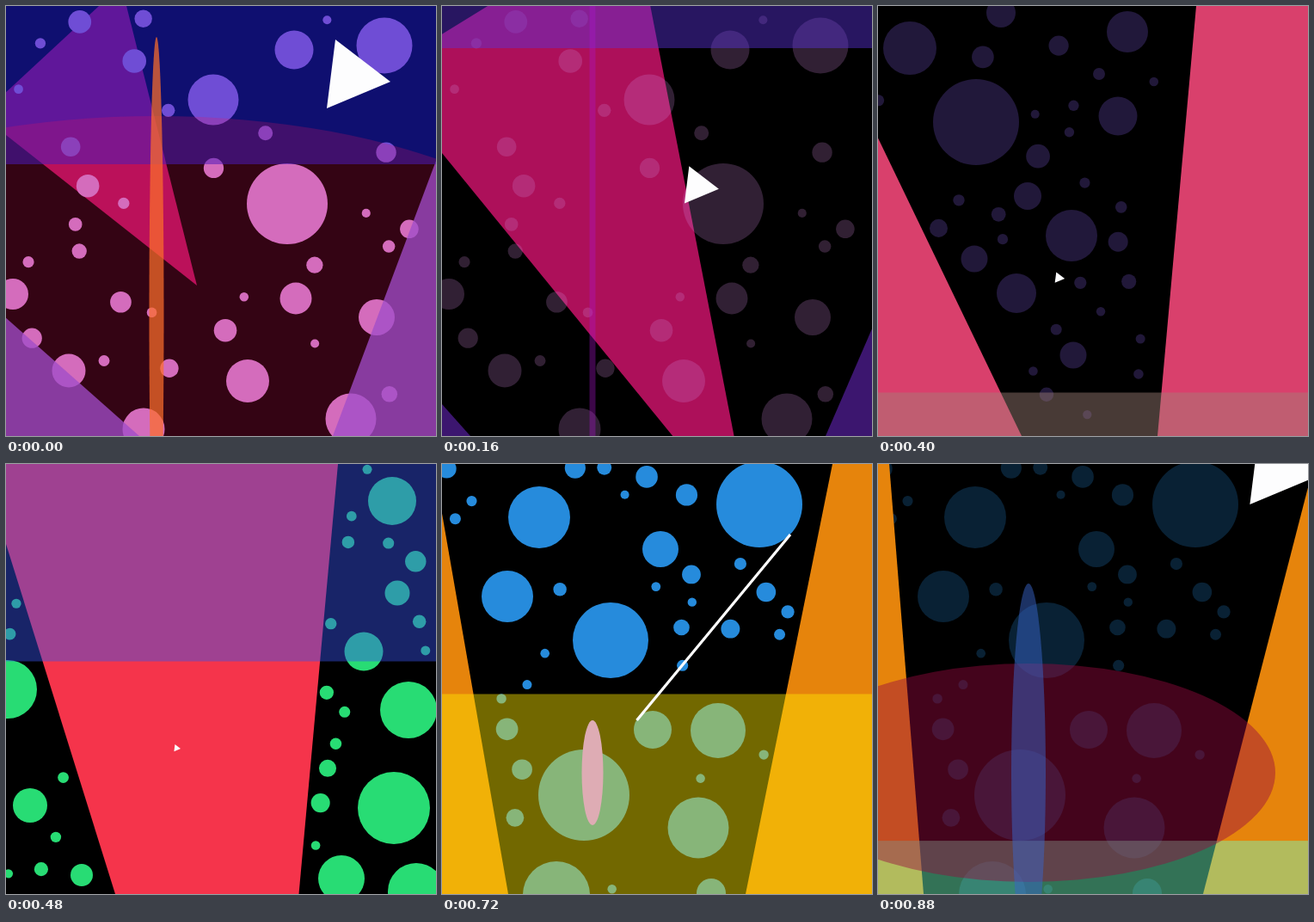
These frames come from a looping animation (500x500 px, 960 ms). An HTML page with a canvas:

```html
<!DOCTYPE html>
<html lang="en">
<head>
<meta charset="utf-8">
<title>Strobe loop</title>
<style>
html, body { margin: 0; width: 100%; height: 100%; overflow: hidden; background: #000; }
canvas { display: block; width: 500px; height: 500px; }
</style>
</head>
<body>
<canvas id="stage" width="500" height="500"></canvas>
<script>
const ctx = document.getElementById('stage').getContext('2d');
const SIZE = 500, STEP = 80, COUNT = 12;
const CX = 175, CY = 359; // vanishing point

// Each scene lasts three steps. walls: left x at top and bottom, right x at top
// and bottom; edge: y of the horizontal split; move and slide: change per step.
// big: main dots as x, y, radius; small: how many more are scattered between.
const scenes = [
  {
    walls: [-410, 155, 567.5, 380], move: [-1, -61, 47.5, 33], edge: 184, slide: -67.5,
    wallFill: ['#8c5de8c4', '#8531f59e', '#8531f573'],
    bandFill: ['#1e1ed387', '#753ad97a', '#5a32d773'],
    dotFill: ['#cd85d7', '#cd85d799', '#cd85d73d'],
    big: [327,230,47, 440,46,32.5, 241,109,29.5, 401,480,29.5, 281,436,25, 160,492,24.5,
      335,51,22.5, 431,362,21, 73,424,19.5, 337,340,18.5, 8,335,18],
    small: 29, fits: () => true
  },
  {
    walls: [-114, 203, 330, 317], move: [20, -18, 20, 4], edge: 307.5, slide: 71, low: true,
    wallFill: ['#d9406c', '#d9406c', '#d9406c'],
    bandFill: ['#f0a02c73', '#c8965073', '#a0827873'],
    dotFill: ['#8c64f0', '#8c64f099', '#8c64f03d'],
    big: [114,135,50, 37,49,31, 225,267,30, 290,30,24, 161,334,23, 279,128,22.5,
      143,8,17, 174,221,16, 227,406,15.5, 112,294,15.5],
    small: 25, fits: (x, r, a, b) => x - r > a && x + r < b
  },
  {
    walls: [-29, 127, 386, 340.5], move: [15.5, -11.25, 24, 2.25], edge: 229.5, slide: -84,
    inner: true,
    wallFill: ['#f5344b', '#f5344b', '#f5344b'],
    bandFill: ['#3550e773', '#5028c373', '#6b00a073'],
    dotFill: ['#28dc74', '#787d5fbf', '#d1214b7a'],
    big: [451,400,42, 2,262,34, 468,286,33, 477,497,33, 449,43,28, 390,482,27,
      416,218,22.5, 28,397,20, 455,150,14.5, 88,478,13],
    small: 20, fits: (x, r, a, b) => x + r < a || x - r > b
  },
  {
    walls: [-10, 77, 454, 353], move: [11.5, -12, 26.5, 12.5], edge: 267.5, slide: 85.3, low: true,
    wallFill: ['#e6840c', '#e6840c', '#e6840c'],
    bandFill: ['#fde70073', '#b6f05e73', '#71fcbe73'],
    dotFill: ['#268bdc', '#268bdc99', '#268bdc3c'],
    big: [165,385,53, 369,47,50, 196,205,44, 133,501,39, 113,62,36, 298,423,35.5,
      321,310,32, 76,154,30, 245,309,22, 254,99,21, 313,499,17],
    small: 28, fits: (x, r, a, b) => x - r > a && x + r < b
  }
];

// Rings around the vanishing point: radius x, radius y, fill.
const wide = {
  11: [287, 127, '#97093e73'],
  0: [525, 231, '#ec125b38'],
  1: [685, 294, '#3264fa14']
};
const tall = {
  7: [4, 23, '#ff8848'],
  8: [8, 43.5, '#ff8848'],
  9: [12.5, 61, '#deacb4'],
  10: [17, 130, '#8c87bebf'],
  11: [20, 220, '#3864c880'],
  0: [8.5, 323, '#fc6e2ab8'],
  1: [5.5, 2400, '#ad16cd99'],
  2: [3.5, 2600, '#ad16cd59']
};

const shard = [134, -24, 222, 325, -29, 127];
const shardMove = [44, -40, 70, 145, -23, -24];

// A white triangle falls to the vanishing point, then a ray shoots back out.
const ship = [208, -320, 272, -271, 198, -240];
const shipScale = [1, .743, .54, .363, .24, .155, .103];
shipScale[11] = 1.3;
const rays = {
  7: [186, 346, 215, 311, .6],
  8: [200, 331, 279.5, 235.5, 1.2],
  9: [226.5, 298, 405, 82, 3.2],
  10: [255, 263, 548, -91, 5]
};

const mix = (a, b, t) => a + (b - a) * t;
const shift = (from, by, t) => from.map((v, i) => v + by[i] * t);

function seeded(s) {
  return () => (s = s * 16807 % 2147483647) / 2147483647;
}

// Fills the gaps between the main dots without touching them or the walls.
function scatter({ big, small, walls: [l0, l1, r0, r1], fits }, seed) {
  const rnd = seeded(seed * 977 + 31), dots = [];
  for (let i = 0; i < big.length; i += 3) dots.push(big.slice(i, i + 3));
  const goal = dots.length + small;
  for (let tries = 0; dots.length < goal && tries < 6000; tries++) {
    const x = rnd() * SIZE, y = rnd() * SIZE, r = 5 + 9 * rnd() ** 1.6;
    const free = dots.every(([a, b, c]) => Math.hypot(x - a, y - b) > r + c + 13);
    if (free && fits(x, r, mix(l0, l1, y / SIZE), mix(r0, r1, y / SIZE))) dots.push([x, y, r]);
  }
  return dots;
}
scenes.forEach((s, i) => { s.dots = scatter(s, i + 1); });

function poly(fill, p) {
  ctx.fillStyle = fill;
  ctx.beginPath();
  for (let i = 0; i < p.length; i += 2) ctx.lineTo(p[i], p[i + 1]);
  ctx.fill();
}

function oval(x, y, rx, ry, fill) {
  ctx.fillStyle = fill;
  ctx.beginPath();
  ctx.ellipse(x, y, rx, ry, 0, 0, Math.PI * 2);
  ctx.fill();
}

function draw(n) {
  const s = scenes[Math.floor(n / 3)], k = n % 3;
  const [l0, l1, r0, r1] = shift(s.walls, s.move, k);
  const wall = s.wallFill[k], y = s.edge + s.slide * k;

  ctx.fillStyle = '#000';
  ctx.fillRect(0, 0, SIZE, SIZE);

  if (n < 3) poly('#ad105a', shift(shard, shardMove, n));
  if (s.inner) poly(wall, [l0, 0, r0, 0, r1, SIZE, l1, SIZE]);
  for (const [x, cy, r] of s.dots) oval(x, cy, r, r, s.dotFill[k]);
  if (!s.inner) {
    poly(wall, [-SIZE, 0, l0, 0, l1, SIZE, -SIZE, SIZE]);
    poly(wall, [2 * SIZE, 0, r0, 0, r1, SIZE, 2 * SIZE, SIZE]);
  }

  ctx.fillStyle = s.bandFill[k];
  if (s.low) ctx.fillRect(0, y, SIZE, SIZE - y);
  else ctx.fillRect(0, 0, SIZE, y);

  for (const ring of [wide[n], tall[n]]) {
    if (ring) oval(CX, CY, ...ring);
  }

  const scale = shipScale[n];
  if (scale) poly(n === 1 ? '#ededed' : '#fdfdfe', ship.map((v, i) => v * scale + (i % 2 ? CY : CX)));

  if (rays[n]) {
    const [x0, y0, x1, y1, w] = rays[n];
    ctx.strokeStyle = '#fff';
    ctx.lineWidth = w;
    ctx.beginPath();
    ctx.moveTo(x0, y0);
    ctx.lineTo(x1, y1);
    ctx.stroke();
  }
}

const start = performance.now();
let shown = -1;
function tick() {
  const n = Math.floor((performance.now() - start) / STEP) % COUNT;
  if (n !== shown) draw(shown = n);
  requestAnimationFrame(tick);
}
tick();
</script>
</body>
</html>
```
